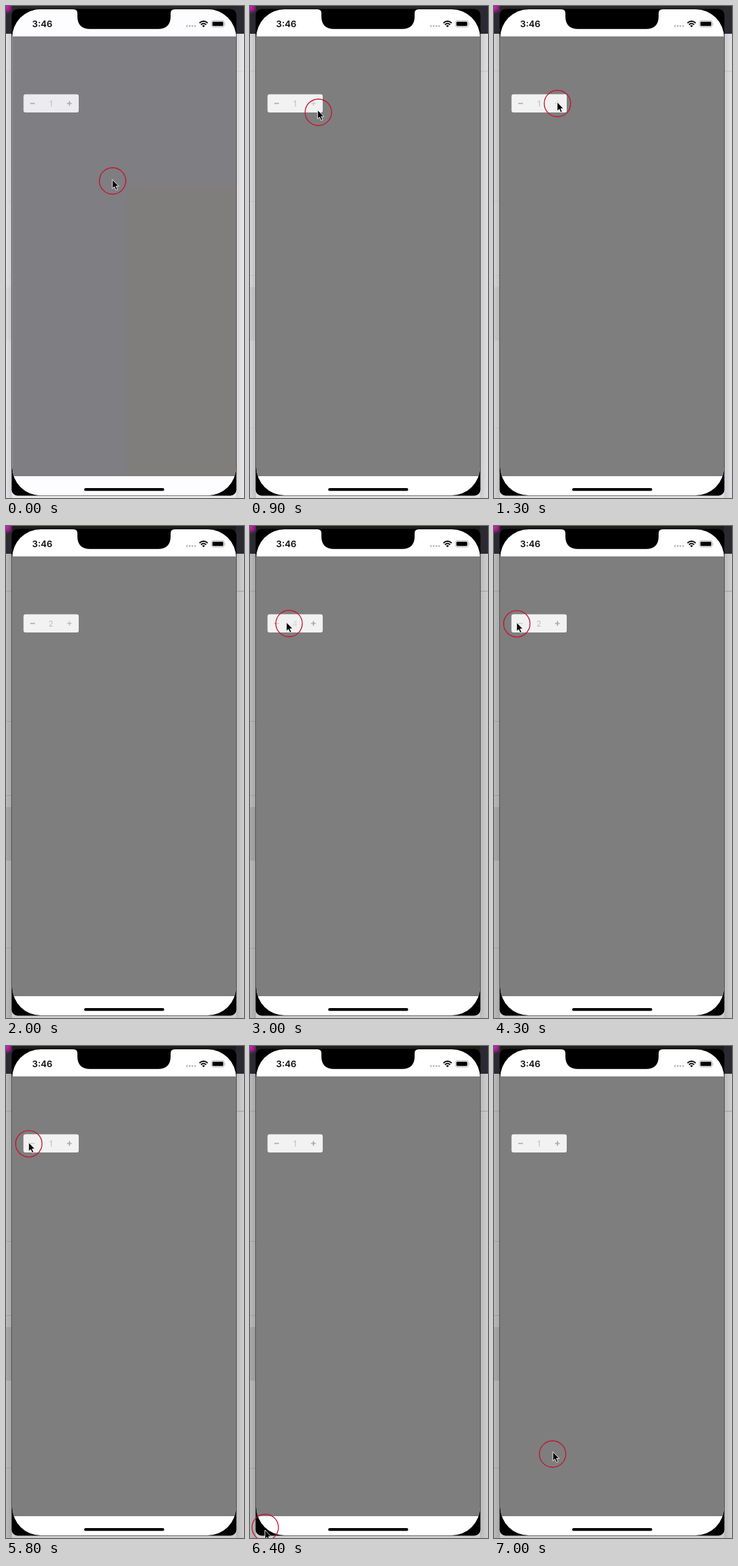
These frames come from a looping animation (360 by 744 pixels, 7.4 s). An HTML page:

```html
<!DOCTYPE html>
<html lang="en">
<head>
<meta charset="utf-8">
<title>Stepper demo</title>
<style>
  html, body { margin: 0; width: 100%; height: 100%; overflow: hidden; background: #c8c8c8; }
  svg { display: block; width: 100vw; height: 100vh; }
  text { font-family: Inter, Roboto, sans-serif; }
</style>
</head>
<body>
<svg viewBox="0 0 360 744">
  <defs>
    <clipPath id="screen"><rect x="9.5" y="5" width="338.5" height="735" rx="43"/></clipPath>
    <clipPath id="box"><rect x="26.5" y="133.5" width="83.5" height="27.5" rx="3"/></clipPath>
    <linearGradient id="shade">
      <stop offset="0" stop-color="#000" stop-opacity="0"/>
      <stop offset="1" stop-color="#000" stop-opacity=".1"/>
    </linearGradient>
    <radialGradient id="glow" gradientUnits="userSpaceOnUse" cx="1" cy="2" r="10">
      <stop offset="0" stop-color="#d41fb4"/>
      <stop offset=".5" stop-color="#a01a8c"/>
      <stop offset="1" stop-color="#a01a8c" stop-opacity="0"/>
    </radialGradient>
  </defs>

  <!-- window behind the phone -->
  <rect width="360" height="744" fill="#cecece"/>
  <rect width="9" height="744" fill="#bababa"/>
  <rect y="425" width="9" height="81" fill="#a9a9a9"/>
  <path d="M0 98.5H360M0 295.5H9M0 407.500H9M0 638.500H9" stroke="#a4a4a4"/>
  <rect id="light" y="42" width="360" height="702" fill="#f8f7fc"/>
  <rect width="9" height="744" fill="url(#shade)"/>
  <rect x="348" width="12" height="744" fill="url(#shade)" transform="matrix(-1 0 0 1 708 0)"/>
  <rect width="360" height="42" fill="#2b2a32"/>
  <rect width="10" height="12" fill="url(#glow)"/>

  <!-- phone -->
  <rect id="brow" x="9" width="339" height="8"/>
  <rect x="8.5" y="4.5" width="340" height="736" rx="9" fill="#000"/>
  <path d="M8.700 42V705M348.400 42V705" stroke="#4e4e4e"/>
  <g clip-path="url(#screen)">
    <rect width="360" height="744" fill="#fff"/>
    <rect y="46" width="360" height="665" fill="#7e7e7e"/>
    <g id="tint">
      <rect width="360" height="744" fill="#fdfcff"/>
      <rect y="46" width="360" height="665" fill="#7f7e82"/>
      <rect x="181" y="274" width="179" height="437" fill="#7f7e7c"/>
    </g>
  </g>
  <path d="M102 5Q108 5 108 11V15.500Q108 34.700 127 34.700H230Q249 34.700 249 15.500V11Q249 5 255 5Z" fill="#000"/>
  <rect x="118.300" y="729" width="121" height="4.300" rx="2.150" fill="#000"/>

  <!-- status bar -->
  <text x="39.500" y="32" font-size="13.600" font-weight="600" fill="#0a0a0a">3:46</text>
  <path d="M273.700 30.300h13" stroke="#bcbcbc" stroke-width="3" stroke-linecap="round" stroke-dasharray="0 4.100"/>
  <g fill="none" stroke="#000" stroke-width="1.900">
    <path d="M292.600 25.800Q298.800 20.300 305 25.800M294.900 28.200Q298.800 24.800 302.700 28.200"/>
    <path d="M298.800 32.200L296.600 29.800Q298.800 28.200 301 29.800Z" fill="#000" stroke="none"/>
  </g>
  <rect x="310.700" y="22.200" width="19.400" height="9.600" rx="2.600" fill="none" stroke="#aaa" stroke-width=".9"/>
  <rect x="312.200" y="23.700" width="16.400" height="6.600" rx="1.400" fill="#000"/>
  <path d="M331.300 25.400Q333 27 331.300 28.700Z" fill="#999"/>

  <!-- stepper -->
  <g clip-path="url(#box)">
    <rect id="face" x="26" y="133" width="85" height="29"/>
    <path id="minus" d="M36.700 147.300h7" stroke="#adadad"/>
    <path id="plus" d="M92.400 147.300h7m-3.500-3.500v7" stroke="#adadad"/>
    <text id="count" x="68" y="151.700" font-size="12" text-anchor="middle" fill="#bbb"></text>
    <circle id="lens" r="19.500" fill="#f2f2f2" opacity=".5"/>
  </g>

  <!-- pointer -->
  <g id="pointer">
    <circle id="ring" r="20" fill="none" stroke="#c4122f" stroke-width="1.350"/>
    <path id="arrow" d="M0 0V13.600L3.100 10.800L5.300 15.800L7.700 14.800L5.500 9.900H9.700Z"
      fill="#000" stroke="#fff" stroke-width=".9" stroke-linejoin="round"/>
  </g>
</svg>
<script>
const LOOP = 7400, TICK = 100, PRESS = 100, REPEAT = 450;
const $ = id => document.getElementById(id);
const clamp = v => Math.max(0, Math.min(1, v));
const mix = (a, b, k) => a + (b - a) * k;
const ease = k => 1 - (1 - k) ** 1.85;

// pointer moves: start, end, target x, y
const home = [161.2, 264.5];
const moves = [
  [0, 1300, 96, 147.5],
  [2800, 3400, 26, 147.5],
  [3500, 3700, 34.5, 147.8],
  [5900, 6400, 23, 728],
  [6500, 7000, 88.6, 617]
];

function place(t) {
  return moves.reduce(([x, y], [from, to, tx, ty]) => {
    const k = ease(clamp((t - from) / (to - from)));
    return [mix(x, tx, k), mix(y, ty, k)];
  }, home);
}

// evenly repeated presses on one button
const presses = (first, n) => Array.from({ length: n }, (_, i) => first + i * REPEAT);
const ups = presses(1500, 3), downs = presses(3750, 5);
const held = (list, t) => list.some(s => t >= s && t < s + PRESS);
const done = (list, t) => list.filter(s => t >= s + PRESS).length;

function draw(t) {
  const [x, y] = place(t), [px, py] = place(t - TICK);
  const lead = (now, was) => now + Math.max(-6, Math.min(6, (now - was) * 0.22));
  const move = (id, mx, my) => $(id).setAttribute('transform', `translate(${mx} ${my})`);
  move('ring', x, y);
  move('lens', x, y);
  move('arrow', lead(x, px) - 0.3, lead(y, py) - 2);

  const up = held(ups, t), down = held(downs, t);
  for (const id of ['pointer', 'lens']) $(id).style.display = up || down ? 'none' : '';
  $('plus').setAttribute('stroke-width', up ? 1.1 : 1.8);
  $('minus').setAttribute('stroke-width', down ? 1.1 : 1.8);
  $('count').textContent = Math.max(1, 1 + done(ups, t) - done(downs, t));

  // the picture starts slightly violet and bright, then settles to grey
  const k = clamp(t / 800), face = mix(236, 242, k), early = t < 1500;
  $('tint').setAttribute('opacity', 1 - k);
  $('light').setAttribute('opacity', early ? mix(0.65, 0.42, k) : 0);
  $('brow').setAttribute('fill', early ? '#29292c' : '#1e1e1a');
  $('face').setAttribute('fill', `rgb(${face},${face},${mix(240, 242, k)})`);
}

const start = performance.now();
function frame() {
  const t = (performance.now() - start) % LOOP;
  draw(Math.floor(t / TICK) * TICK);
  requestAnimationFrame(frame);
}
frame();
</script>
</body>
</html>
```
